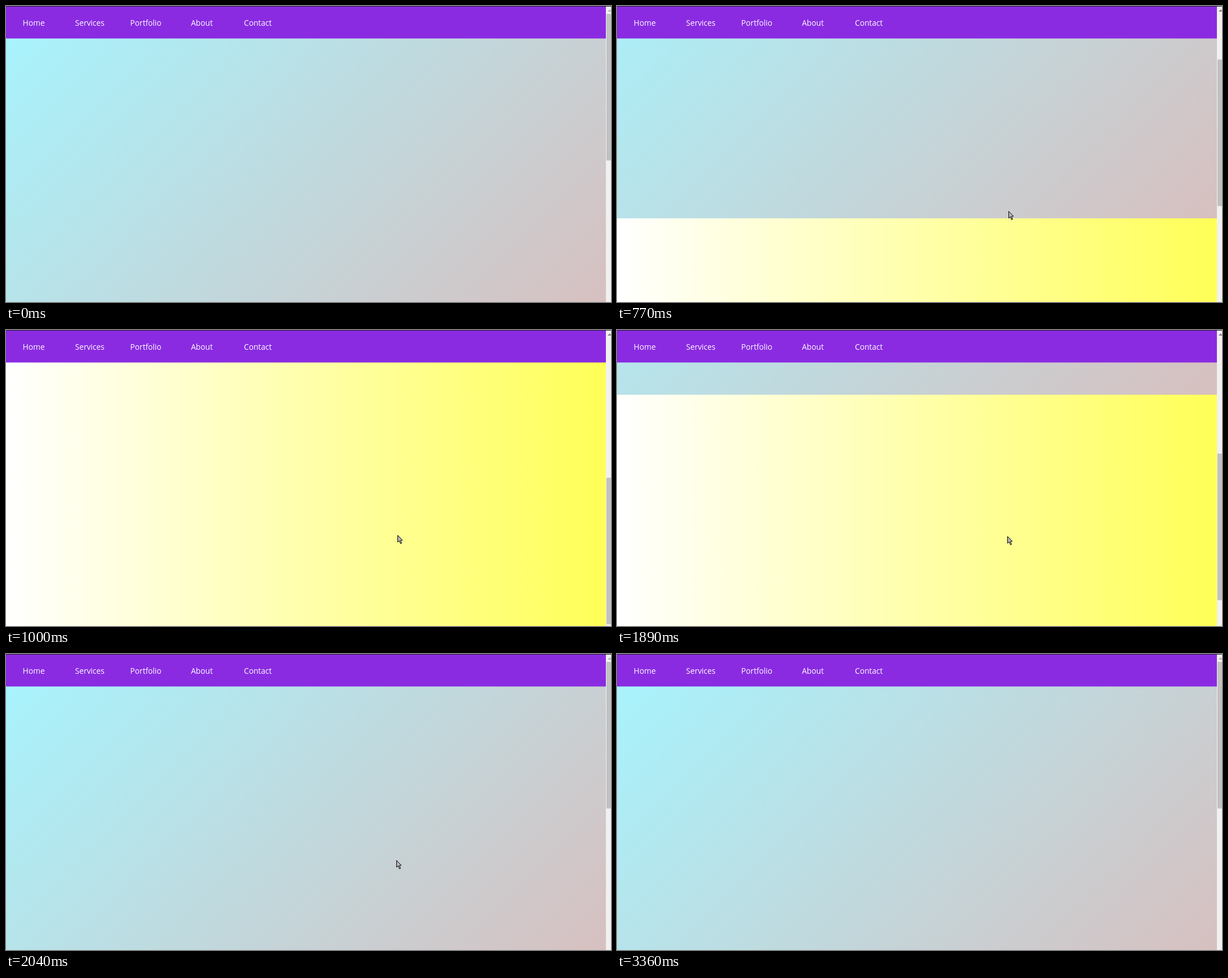
Recreate the animation shown at these times as an HTML page with a canvas. Size 1068 by 524 pixels, loop 3.44 s.

```html
<!DOCTYPE html>
<html lang="en">
<head>
<meta charset="utf-8">
<title>Sticky navigation</title>
<style>
  html, body { margin: 0; width: 100%; height: 100%; overflow: hidden; }
  canvas { display: block; width: 100vw; height: 100vh; }
</style>
</head>
<body>
<canvas id="stage" width="1068" height="524"></canvas>
<script>
const W = 1068, H = 524, LOOP = 3440, STEP = 76;
const PAGE_W = 1059, NAV_BOTTOM = 57.5, TOP = 1;
const FOLD = 545.7, MAX_SCROLL = 521;
const LINKS = ["Home", "Services", "Portfolio", "About", "Contact"];
const ARROW = [[0, 0], [0, 12], [2.8, 9.6], [5, 14.8], [7, 14], [4.8, 8.9], [8.3, 8.6]];

// Times in ms; "first" is the first visible step of the move
const scrollDown = { start: 550, first: 610, end: 990 };
const scrollUp = { start: 1813, first: 1884, end: 2036 };
const enter = { start: 70, first: 70, end: 222 };
const leave = { start: 2364, first: 2440, end: 2516 };
const NUDGE = 1540, HIDE = leave.end + STEP;

const ctx = document.getElementById("stage").getContext("2d");

const easeIn = p => p ** 1.535;
const easeOut = p => 1 - easeIn(1 - p);
const mix = (a, b, p) => a + (b - a) * p;

// Progress 0..1 of a move, advancing in steps
function progress({ start, first, end }, t) {
  if (t < first) return 0;
  const stepped = first + Math.floor((t - first) / STEP) * STEP;
  return Math.min(1, (stepped - start) / (end - start));
}

function scrollAt(t) {
  return MAX_SCROLL * (easeIn(progress(scrollDown, t)) - easeIn(progress(scrollUp, t)));
}

function pointerAt(t) {
  const nudge = t < NUDGE ? 0 : 2;
  const restX = 691 - nudge, restY = 363 + nudge;
  const away = easeIn(progress(leave, t));
  if (away) return [mix(restX, 771, away), mix(restY, 427, away)];
  const near = easeOut(progress(enter, t));
  return [mix(874, restX, near), mix(427, restY, near)];
}

function rect(color, x, y, w, h) {
  ctx.fillStyle = color;
  ctx.fillRect(x, y, w, h);
}

function polygon(points) {
  ctx.beginPath();
  points.forEach(([x, y]) => ctx.lineTo(x, y));
  ctx.closePath();
}

function gradient(x0, y0, x1, y1, from, to) {
  const g = ctx.createLinearGradient(x0, y0, x1, y1);
  g.addColorStop(0, from);
  g.addColorStop(1, to);
  return g;
}

function drawPage(scroll) {
  const top = TOP - scroll, fold = FOLD - scroll;
  const cx = PAGE_W / 2, cy = (top + fold) / 2;
  const reach = (PAGE_W + fold - top) / 4; // 135 degree gradient
  rect(gradient(0, 0, PAGE_W, 0, "#ffffff", "#ffff57"), 0, 0, PAGE_W, H);
  rect(gradient(cx - reach, cy - reach, cx + reach, cy + reach, "#a6f5ff", "#d8bfbf"),
    0, top, PAGE_W, fold - top);
}

function drawNav() {
  rect("#8a2be2", 0, TOP, PAGE_W, NAV_BOTTOM - TOP);
  ctx.fillStyle = "#fff";
  ctx.font = '500 13.7px "Open Sans", "Noto Sans", sans-serif';
  ctx.textAlign = "center";
  ctx.textBaseline = "alphabetic";
  LINKS.forEach((label, i) => ctx.fillText(label, 49 + i * 98.9, 35));
}

function drawScrollbar(scroll) {
  rect("#f1f1f1", PAGE_W, TOP, W - PAGE_W, H);
  rect("#c1c1c1", 1060, 14 + scroll / MAX_SCROLL * 247.5, 8, 259.5);
  polygon([[1062, 10], [1065.5, 6], [1069, 10]]);
  ctx.fillStyle = scroll ? "#858585" : "#b5b5b5";
  ctx.fill();
}

function drawPointer([x, y]) {
  ctx.save();
  ctx.translate(x + 0.5, y + 0.5);
  polygon(ARROW);
  ctx.fillStyle = "#bab8b6";
  ctx.fill();
  ctx.strokeStyle = "#000";
  ctx.lineWidth = 1;
  ctx.lineJoin = "round";
  ctx.stroke();
  ctx.restore();
}

function draw(now) {
  const t = now % LOOP;
  const scroll = scrollAt(t);
  drawPage(scroll);
  drawNav();
  drawScrollbar(scroll);
  rect("#1c1a20", 0, 0, W, TOP);
  if (t >= enter.first && t < HIDE) drawPointer(pointerAt(t));
}

let begin;
function tick(now) {
  begin ??= now;
  draw(Math.max(0, now - begin));
  requestAnimationFrame(tick);
}
draw(0);
requestAnimationFrame(tick);
</script>
</body>
</html>
```
